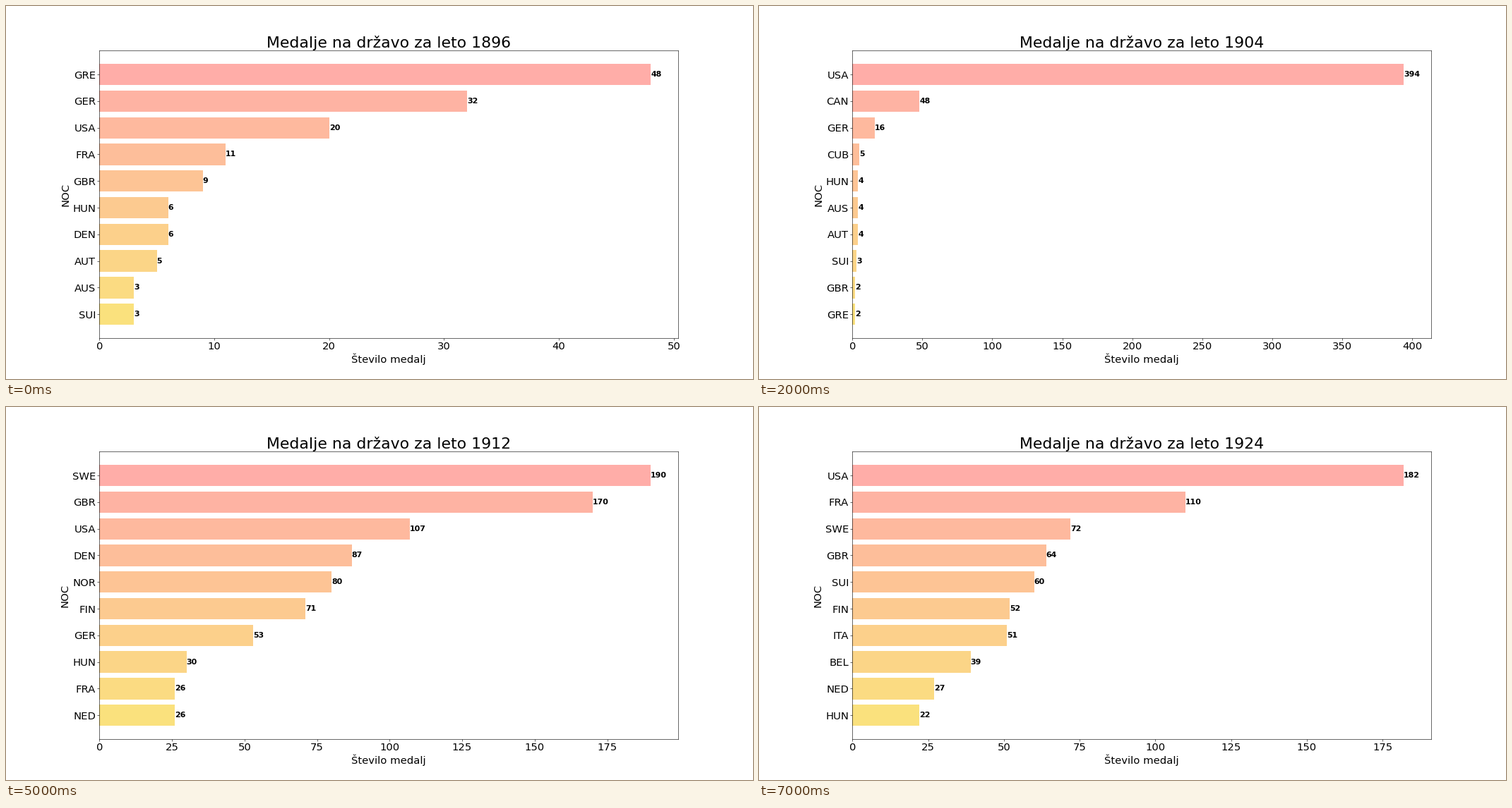
These frames come from a looping animation (1058x529 px, 8 s). A matplotlib script:

```python
import matplotlib.pyplot as plt
import numpy as np
from matplotlib.animation import FuncAnimation

plt.rcParams.update({
    "font.family": "DejaVu Sans",
    "xtick.labelsize": 20,
    "ytick.labelsize": 20,
    "axes.labelsize": 20,
    "axes.titlesize": 30,
})

# Top ten countries per year, ordered by medal count.
MEDALS = {
    1896: "GRE 48 GER 32 USA 20 FRA 11 GBR 9 HUN 6 DEN 6 AUT 5 AUS 3 SUI 3",
    1900: "FRA 235 GBR 108 USA 63 GER 41 BEL 39 NED 29 SUI 21 DEN 14 AUS 6 AUT 6",
    1904: "USA 394 CAN 48 GER 16 CUB 5 HUN 4 AUS 4 AUT 4 SUI 3 GBR 2 GRE 2",
    1906: "GRE 102 FRA 64 ITA 56 GBR 39 DEN 34 GER 30 NOR 25 USA 24 SWE 21 HUN 13",
    1908: "GBR 368 SWE 84 USA 65 CAN 52 NOR 42 FRA 40 BEL 33 FIN 30 GER 21 HUN 20",
    1912: "SWE 190 GBR 170 USA 107 DEN 87 NOR 80 FIN 71 GER 53 HUN 30 FRA 26 NED 26",
    1920: "USA 194 BEL 188 FRA 141 SWE 136 NOR 129 GBR 111 ITA 84 NED 58 DEN 52 FIN 51",
    1924: "USA 182 FRA 110 SWE 72 GBR 64 SUI 60 FIN 52 ITA 51 BEL 39 NED 27 HUN 22",
}
YEARS = list(MEDALS)

PINK = np.array([255, 173, 168]) / 255
YELLOW = np.array([250, 225, 125]) / 255
COLORS = [PINK + (YELLOW - PINK) * t for t in np.linspace(0, 1, 10)]

fig, ax = plt.subplots(figsize=(20, 10), dpi=52.9)


def draw_year(index):
    year = YEARS[index]
    fields = MEDALS[year].split()
    countries = fields[::2]
    counts = [int(n) for n in fields[1::2]]

    ax.clear()
    ax.barh(countries, counts, color=COLORS)
    ax.invert_yaxis()
    for row, count in enumerate(counts):
        ax.text(count, row, str(count), va="center", fontsize=15, fontweight="bold")
    ax.set_title(f"Medalje na državo za leto {year}")
    ax.set_xlabel("Število medalj")
    ax.set_ylabel("NOC")


anim = FuncAnimation(fig, draw_year, frames=len(YEARS), interval=1000,
                     init_func=lambda: None, repeat=True)
plt.show()
```
